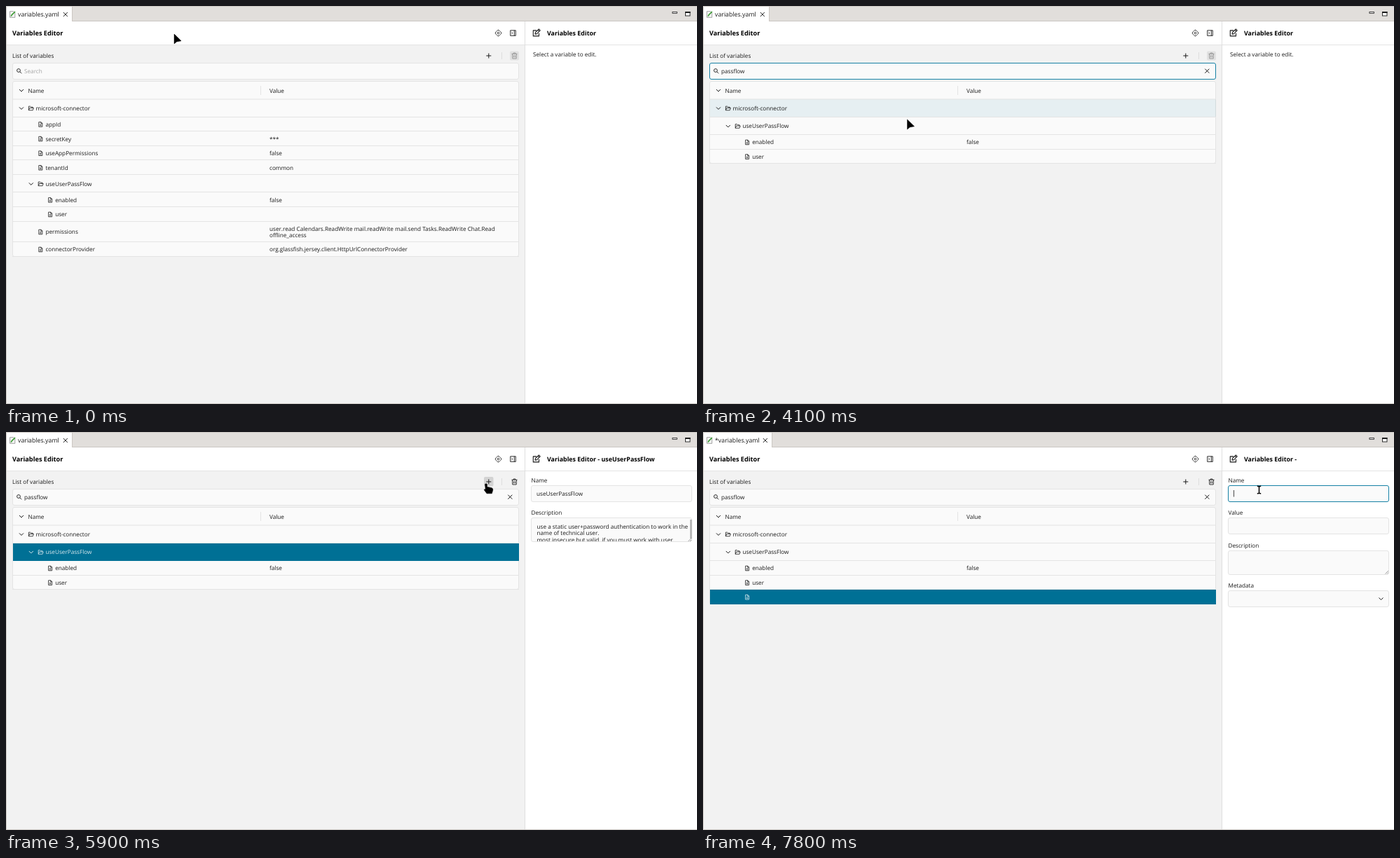
These frames come from a looping animation (986 px wide and 568 px high, 8 s). An HTML page:

```html
<!DOCTYPE html>
<html lang="en">
<head>
<meta charset="utf-8">
<title>Variables Editor</title>
<style>
  html, body { margin: 0; width: 100%; height: 100%; overflow: hidden; background: #f2f2f2; }
  svg { display: block; width: 986px; height: 568px; }
  text { font-family: "Open Sans", "Noto Sans", sans-serif; text-rendering: geometricPrecision; white-space: pre; }
</style>
</head>
<body>
<svg id="stage" viewBox="0 0 986 568"></svg>
<script>
const LOOP = 8000, STEP = 100;
const INK = '#1b1b1b', LINE = '#e4e4e4', FIELD = '#fafafa', ACCENT = '#007095', LIGHT = '#d8e9ee';
const stage = document.getElementById('stage');
const ruler = document.createElement('canvas').getContext('2d');
ruler.font = '8.2px "Open Sans", "Noto Sans", sans-serif';

// Drawing helpers
const rect = (x, y, w, h, fill, more = '') =>
  `<rect x="${x}" y="${y}" width="${w}" height="${h}" fill="${fill}" ${more}/>`;
const box = (x, y, w, h, stroke = LINE, fill = FIELD) =>
  rect(x + .5, y + .5, w - 1, h - 1, fill, `stroke="${stroke}" rx="2.5"`);
const text = (x, mid, s, { size = 8.2, weight = 400, fill = INK } = {}) =>
  `<text x="${x}" y="${mid + size * .36}" font-size="${size}" font-weight="${weight}" fill="${fill}">${s}</text>`;
const path = (x, y, d, color = INK, width = .9, fill = 'none') =>
  `<path transform="translate(${x} ${y})" d="${d}" fill="${fill}" stroke="${color}" stroke-width="${width}" stroke-linejoin="round"/>`;
const bold = size => ({ size, weight: 700, fill: '#000' });

// Icons are centred on their position
const chevron = (x, y, c) => path(x, y, 'M-3-1.5L0 1.5L3-1.5', c, 1);
const cross = (x, y) => path(x, y, 'M-3-3L3 3M3-3L-3 3', INK, 1);
const folder = (x, y, c) => path(x, y, 'M-3.3 2.8V-2.8H-1L0-1.7H2.5V-.4M-3.3 2.8L-2-.4H3.7L2.6 2.8Z', c, .8);
const sheet = (x, y, c) => path(x, y, 'M-2.5-3.3H.8L2.5-1.6V3.3H-2.5ZM.6-3.3V-1.4H2.5M-1.2 .2H1.2M-1.2 1.7H1.2', c, .8);
const trash = (x, y, c) => path(x, y, 'M-4-2.7H4M-1.4-2.9V-4H1.4V-2.9M-3-2.5L-2.7 4H2.7L3-2.5M-1-.8V2.3M1-.8V2.3', c, .9);

function gear(x, y) {
  let d = '';
  for (let i = 0; i < 16; i++) {
    const a = (i - .5) * Math.PI / 8, r = i % 4 < 2 ? 4.2 : 3.6;
    d += `${i ? 'L' : 'M'}${(r * Math.cos(a)).toFixed(2)} ${(r * Math.sin(a)).toFixed(2)}`;
  }
  return path(x, y, d + 'Z') + `<circle cx="${x}" cy="${y}" r="1.4" fill="none" stroke="${INK}" stroke-width=".9"/>`;
}

// Variable tree: [depth, name, value, is folder]
const ROOT = [0, 'microsoft-connector', '', true];
const FLOW = [1, 'useUserPassFlow', '', true];
const NESTED = [FLOW, [2, 'enabled', 'false'], [2, 'user', '']];
const APP_ID = [1, 'appId', ''], APP_PERM = [1, 'useAppPermissions', 'false'];
const TAIL = [
  [1, 'permissions', 'user.read Calendars.ReadWrite mail.readWrite mail.send Tasks.ReadWrite Chat.Read\noffline_access'],
  [1, 'connectorProvider', 'org.glassfish.jersey.client.HttpUrlConnectorProvider'],
];
const FULL = [ROOT, APP_ID, [1, 'secretKey', '***'], APP_PERM, [1, 'tenantId', 'common'], ...NESTED, ...TAIL];
const WITH_P = [ROOT, APP_ID, APP_PERM, ...NESTED, ...TAIL];
const FOUND = [ROOT, ...NESTED];
const ADDED = [2, '', ''];

// Times of the typed letters and of the clicks
const KEYS = [1600, 1800, 2000, 2500, 2700, 2800, 3000, 3100];
const FOCUS = 1100, SELECT = 4500, ADD = 6200, NAME_FOCUS = 7800;

const POINTER = [
  [0, 240, 40], [500, 240, 40], [600, 241, 46], [900, 247.7, 92.5], [3600, 247.7, 92.5],
  [3700, 250, 97], [4100, 291.5, 162], [4300, 293, 167.5], [4800, 293, 167.5], [5100, 440, 128],
  [5300, 569, 88], [5500, 640, 79], [5700, 682, 74], [6000, 688, 73], [6900, 688, 73],
  [7100, 740, 76], [7300, 793.5, 82.5], [8000, 793.5, 82.5],
];

function track(keys, t) {
  const i = Math.max(1, keys.findIndex(k => k[0] >= t));
  const a = keys[i - 1], b = keys[i], p = (t - a[0]) / (b[0] - a[0]);
  return a.slice(1).map((v, n) => v + (b[n + 1] - v) * p);
}

const within = (t, from, to) => t >= from && t < to;
const onPlus = t => within(t, 5700, 7000);

function pointer(t) {
  const [x, y] = track(POINTER, t);
  if (within(t, 900, 3700) || t >= 7300)
    return path(x, y, 'M-2.7-5.3Q0-5.3 0-4Q0-5.3 2.7-5.3M0-4.5V4.5M-2.7 5.3Q0 5.3 0 4Q0 5.3 2.7 5.3', '#000', 1.5);
  if (onPlus(t))
    return path(x, y, 'M-2.5 1.2Q-1-.6 .5 1.2V5L7 6.3Q9.3 7 8.7 10L7.3 14.5H0L-3.7 9.5Q-3.8 7.8-1.8 8.5Z', '#000', .5, '#000');
  return path(x, y, 'M0 0V14L3.6 11L10 9.8Z', '#000', .5, '#000');
}

// Strength of the accent tint over a row
function tint(row, t) {
  if (row === ADDED) return 1;
  if (row === ROOT) return within(t, 4000, 4200) || within(t, 5000, 5200) ? .08 : 0;
  if (row !== FLOW || t < 4200) return 0;
  return track([[4200, .08], [4500, .08], [4600, .21], [4700, .72], [4800, 1],
    [6100, 1], [6200, .86], [6300, .45], [6400, .1], [6500, 0], [8000, 0]], t)[0];
}

function table(t) {
  const rows = t < KEYS[0] ? FULL : t < KEYS[1] ? WITH_P : t < ADD ? FOUND : [...FOUND, ADDED];
  let y = 133, out = chevron(22, 120.5) + text(31.5, 120.7, 'Name') + text(376, 120.7, 'Value')
    + rect(363, 114, 1, 13, LINE) + rect(9, 132.5, 723, 1, LINE);
  let back = '';
  for (const row of rows) {
    const [depth, name, value, isFolder] = row;
    const lines = value.split('\n');
    const h = isFolder ? 25.5 : lines.length > 1 ? 29.4 : 20.6;
    const mid = y + h / 2 + .2, x = 22 + depth * 13.8, strength = tint(row, t);
    const ink = strength > .5 ? LIGHT : INK;
    const top = Math.round(y), end = Math.round(y + h);
    if (strength) back += rect(10, top, 722, end - top, ACCENT, `opacity="${strength}"`);
    out += rect(9, end - 1, 723, 1, LINE, strength > .5 ? 'opacity="0"' : '');
    out += isFolder
      ? chevron(x, mid, ink) + folder(x + 13.7, mid, ink) + text(x + 20.6, mid, name, { fill: ink })
      : sheet(x + 13.5, mid, ink) + text(x + 20.6, mid, name, { fill: ink });
    lines.forEach((s, i) => out += text(376, mid + (i - (lines.length - 1) / 2) * 9.2, s));
    y += h;
  }
  return box(9, 107, 723, Math.round(y) - 107) + back + out;
}

function search(t) {
  const typed = 'passflow'.slice(0, KEYS.filter(k => k <= t).length);
  const focused = within(t, FOCUS, SELECT);
  let out = box(9, 81, 723, 24, focused ? '#1681a5' : LINE)
    + path(18.3, 92, 'M2.1 0A2.4 2.4 0 1 1-2.7 0A2.4 2.4 0 1 1 2.1 0M1.4 1.7L4 4.2')
    + text(26, 92.7, typed || 'Search', { fill: typed ? INK : '#a3a3a3' });
  if (typed) out += cross(719.3, 92.7);
  if (within(t, FOCUS, 3700)) out += rect(26 + ruler.measureText(typed).width, 88, .8, 9.5, INK);
  return out;
}

function details(t) {
  const x = 749.5, w = 230;
  const label = (mid, s) => text(x, mid, s);
  const grip = y => path(978, y, 'M-4.5 0L0-4.5M-2 0L0-2', '#777', .7);
  const title = t < SELECT ? '' : t < ADD ? ' - useUserPassFlow' : ' -';
  let out = text(772, 38.7, 'Variables Editor' + title, bold(8.9));
  if (t < SELECT) return out + text(752, 68.8, 'Select a variable to edit.');
  out += label(69, 'Name') + box(749, 76, w, 24, t >= NAME_FOCUS ? '#1681a5' : LINE);
  if (t < ADD) {
    const notes = ['use a static user+password authentication to work in the', 'name of technical user.',
      'most insecure but valid, if you must work with user'];
    return out + text(757, 88, 'useUserPassFlow') + label(115.3, 'Description') + box(749, 122, w, 35)
      + `<g clip-path="url(#notes)">${notes.map((s, i) => text(757.5, 134.6 + i * 9.7, s)).join('')}</g>`
      + rect(976, 125, 2.8, 27, '#b5b5b5') + grip(156);
  }
  if (t >= NAME_FOCUS) out += rect(757, 83, .8, 9.5, INK);
  return out + label(115.3, 'Value') + box(749, 122, w, 24)
    + label(162, 'Description') + box(749, 169, w, 35) + grip(202.5)
    + label(219, 'Metadata') + box(749, 226, w, 24) + chevron(967.5, 238);
}

function frame(t) {
  const dirty = t >= ADD, canDelete = t >= 4700;
  return '<clipPath id="notes"><rect x="750" y="123" width="226" height="33"/></clipPath>'
    + rect(0, 0, 986, 568, '#f2f2f2') + rect(0, 0, 986, 22, '#e1dedb')
    + rect(0, 22, 741, 33, '#fff') + rect(741, 22, 245, 546, '#fff')
    + rect(0, 55, 986, 1, LINE) + rect(740, 22, 1, 546, '#e0e0e0')
    + rect(0, 0, 986, 1, '#cbc7c3') + rect(0, 21, 986, 1, '#cbc7c3')
    // file tab
    + rect(1, 1, dirty ? 97 : 93, 21, '#fff') + rect(dirty ? 98 : 94, 1, 1, 21, '#cbc7c3')
    + path(9.3, 12, 'M-3.7-4.3H1.5L3.5-2.3V4.3H-3.7Z', '#8a8a8a', .8, '#f6f6f6')
    + path(9.3, 12, 'M-2 2.8L-1.2 .8L3.7-4', '#3d9b35', 1.7)
    + text(17, 12, (dirty ? '*' : '') + 'variables.yaml', { size: 8.8 }) + cross(dirty ? 88.8 : 84.8, 12)
    + rect(951, 8.5, 6.5, 2, '#fff', `stroke="${INK}" stroke-width=".8"`)
    + rect(969.5, 8.5, 6.5, 5.5, '#fff', `stroke="${INK}" stroke-width=".9"`) + rect(969, 8, 7.5, 2, INK)
    // toolbars
    + text(9, 38.6, 'Variables Editor', bold(9.2)) + gear(702.5, 38.6)
    + path(723.5, 38.6, 'M-3.8-3.8H3.8V3.8H-3.8ZM1.8-3.8V3.8M-2.2-1.5L-.6 0L-2.2 1.5')
    + path(757, 38.2, 'M0-3.3H-4.7V4.7H3.5V.5M-2 2L-1.5-.5L3.4-5.2L5.2-3.4L.5 1.4ZM2-3.8L3.9-2', INK, 1.1)
    + text(9, 71.2, 'List of variables')
    + (onPlus(t) ? rect(682, 64, 13.5, 13.5, '#d3d3d3', 'rx="2"') : '')
    + path(688.8, 71, 'M-3.5 0H3.5M0-3.5V3.5', INK, 1) + rect(707, 66, 1, 10, '#dedede')
    + (canDelete ? '' : rect(719, 64.5, 13, 13, '#e1e1e1', 'rx="2"'))
    + trash(725.5, 71, canDelete ? INK : '#909090')
    + search(t) + table(t) + details(t)
    + rect(0, 0, 1, 568, '#cbc7c3') + rect(0, 567, 986, 1, '#cbc7c3')
    + pointer(t);
}

let shown = -1;
function tick() {
  const t = Math.floor(performance.now() % LOOP / STEP) * STEP;
  if (t !== shown) stage.innerHTML = frame(shown = t);
  requestAnimationFrame(tick);
}
tick();
</script>
</body>
</html>
```
